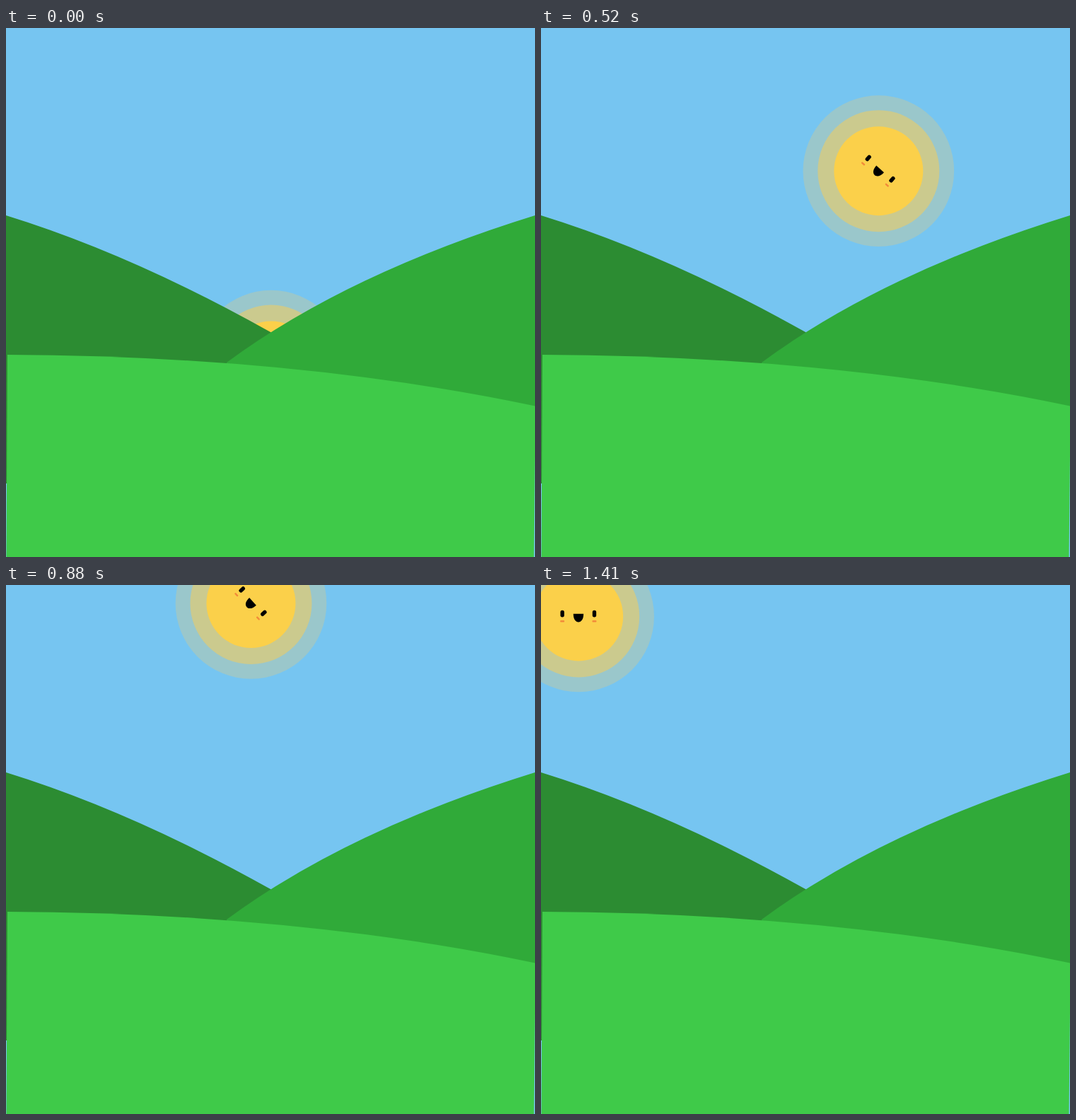
These frames come from a looping animation (748x748 px, 2.13 s). An HTML page:

```html
<!DOCTYPE html>
<html lang="en">
<head>
<meta charset="utf-8">
<title>Sunrise</title>
<style>
html, body { margin: 0; width: 100%; height: 100%; overflow: hidden; background: #76c5f1; }
svg { display: block; width: 100vw; height: 100vh; }
</style>
</head>
<body>
<svg viewBox="0 0 748 748">
  <rect width="748" height="748" fill="#76c5f1"/>
  <g id="sun">
    <circle r="106.8" fill="#9ac7cb"/>
    <circle r="86" fill="#cbca8e"/>
    <circle r="63" fill="#fbd04a"/>
    <g id="face">
      <rect x="-25.7" y="-8.6" width="5.4" height="9.6" rx="2.6"/>
      <rect x="19.6" y="-8.6" width="5.4" height="9.6" rx="2.6"/>
      <path d="M-7.4-3.6H7C7 4.4 3.6 8-.2 8S-7.4 4.4-7.4-3.6Z"/>
      <g fill="#f28a3a">
        <rect x="-26" y="5.7" width="6" height="2.4" rx="1"/>
        <rect x="19.3" y="5.7" width="6" height="2.4" rx="1"/>
      </g>
    </g>
  </g>
  <path fill="#2c8c32" d="M0 265Q178 320 374 430L450 475V644H0Z"/>
  <path fill="#30aa39" d="M312 473Q483 347 748 265V605H312Z"/>
  <path fill="#3fca49" d="M2 462Q413 464 748 534.5V604L746.5 748H.5Z"/>
</svg>
<script>
const LOOP = 2130, RISE_END = 1410;
const CENTER = { x: 214, y: 261 }, RADIUS = 269.8, START = 53.4;
const sun = document.getElementById('sun');
const face = document.getElementById('face');

// Degrees travelled along the half circle, advancing in held steps
function travelled(t) {
  if (t >= RISE_END) return 180;
  if (t >= 1130) return 142 + 38 * (Math.floor((t - 1130) / 35) + 1) / 9;
  const lag = t < 190 ? 0 : t < 1000 ? 10 : 20;
  const step = Math.floor((t - lag + 0.01) / 30);
  return Math.max(0, 4 * step - 2);
}

function draw(t) {
  const a = travelled(t), p = a / 180;
  const angle = (START - a) * Math.PI / 180;
  const x = CENTER.x + RADIUS * Math.cos(angle);
  const y = CENTER.y + RADIUS * Math.sin(angle);
  const tilt = p * (1 - p) * (158 + 58 * p + 60 * p ** 4);
  sun.setAttribute('transform', `translate(${x.toFixed(2)} ${y.toFixed(2)})`);
  face.setAttribute('transform', `rotate(${tilt.toFixed(2)})`);
}

const begin = performance.now();
function tick() {
  draw((performance.now() - begin) % LOOP);
  requestAnimationFrame(tick);
}
draw(0);
requestAnimationFrame(tick);
</script>
</body>
</html>
```
